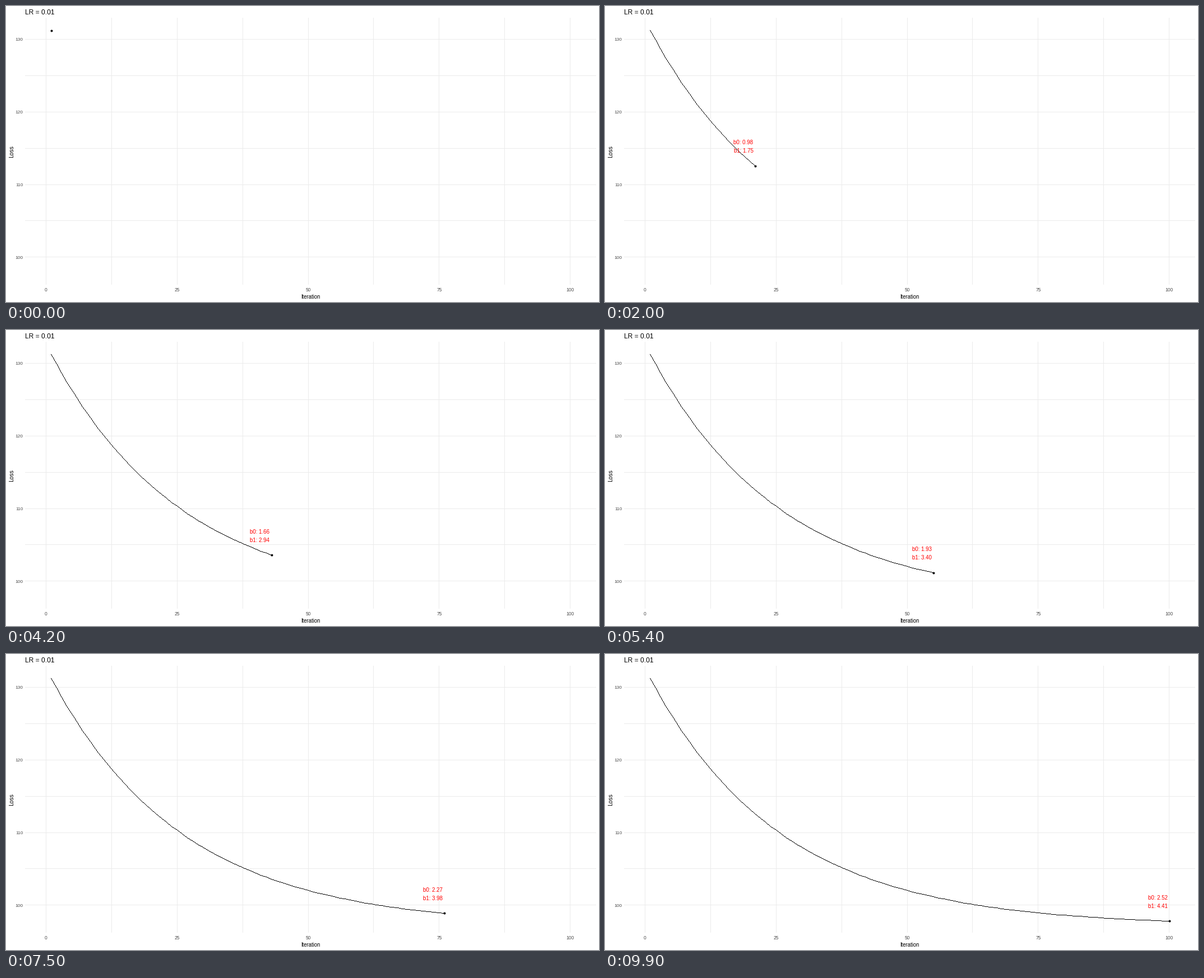
Write a matplotlib script that moves like this. It is 1058 px wide and 529 px high and loops after 10 s.

```python
import numpy as np
import matplotlib.pyplot as plt
from matplotlib.animation import FuncAnimation
from matplotlib.collections import PolyCollection
from matplotlib.patches import Rectangle

W, H, DPI = 1058, 529, 64
PT = 72 / DPI  # points per pixel
STEPS = 100
LEFT, RIGHT, TOP, BOTTOM = 34, 1053, 21, 498
GRID, TICK = "#ebebeb", "#4d4d4d"

plt.rcParams["font.family"] = "Liberation Sans"

fig = plt.figure(figsize=(W / DPI, H / DPI), dpi=DPI, facecolor="white")
ax = fig.add_axes([0, 0, 1, 1])
ax.set_xlim(0, W)
ax.set_ylim(H, 0)
ax.axis("off")


def px(iteration):
    return 71.3 + 9.355 * iteration


def py(loss):
    return 59.1 + 12.995 * (130 - loss)


def label(x, y, text, size, **kw):
    return ax.text(x, y, text, fontsize=size * PT,
                   **{"ha": "center", "va": "baseline", **kw})


def rule(x, y, w, h):
    ax.add_patch(Rectangle((x, y), w, h, fc=GRID, lw=0, zorder=1))


def pixel_line(x, y):
    """Pixels of a hard-edged line through whole-pixel points, with the
    number of pixels used up to each point."""
    pixels, counts = [np.array([[x[0], y[0]]])], [1]
    for i in range(1, len(x)):
        n = int(max(abs(x[i] - x[i - 1]), abs(y[i] - y[i - 1])))
        t = np.arange(1, n + 1) / n
        step = np.column_stack([x[i - 1] + t * (x[i] - x[i - 1]),
                                y[i - 1] + t * (y[i] - y[i - 1])])
        pixels.append(np.floor(step + 0.5))
        counts.append(counts[-1] + n)
    return np.vstack(pixels), counts


# Grid and axis labels
for v in np.arange(0, 101, 12.5):
    x = px(v)
    rule(np.floor(x), TOP, 1, BOTTOM - TOP)
    if v % 25 == 0:
        label(x, 510.5, f"{v:.0f}", 8.5, color=TICK)
for v in range(100, 131, 5):
    y = py(v)
    rule(LEFT, np.floor(y), RIGHT - LEFT, 1)
    if v % 10 == 0:
        label(30.3, y + 3.2, str(v), 8.3, color=TICK, ha="right")

label(33.5, 15, "LR = 0.01", 12, ha="left")
label(543, 523, "Iteration", 9.5)
label(15.2, 260.5, "Loss", 10.2, rotation=90, va="center", ha="right")

# Gradient descent: both coefficients and the loss decay geometrically
n = np.arange(STEPS)
loss_decay = 0.9612 ** n
coef_decay = 0.9804 ** n
xs = px(n + 1)
ys = py(97.13 + 34.07 * loss_decay)
b0 = 2.923 - 2.89 * coef_decay
b1 = 5.115 - 5.0 * coef_decay

pixels, counts = pixel_line(np.floor(xs), np.floor(ys))
corners = np.array([[0, 0], [1, 0], [1, 1], [0, 1]])
squares = pixels[:, None, :] + corners

panel = Rectangle((LEFT, TOP), RIGHT - LEFT, BOTTOM - TOP,
                  transform=ax.transData)
curve = PolyCollection([], facecolors="black", linewidths=0, zorder=3)
ax.add_collection(curve, autolim=False)
dot, = ax.plot([], [], "o", color="black", ms=4 * PT, mew=0, zorder=4)
notes = [label(0, 0, "", 9.8, color="red", zorder=5, clip_on=True)
         for _ in range(2)]
for note in notes:
    note.set_clip_path(panel)


def draw(i):
    curve.set_verts(squares[:counts[i]])
    dot.set_data([xs[i]], [ys[i]])
    for k, (note, b) in enumerate(zip(notes, (b0, b1))):
        note.set_position((xs[i] - 20.8, ys[i] - 38.5 + 15 * k))
        note.set_text(f"b{k}: {b[i]:.2f}")
    return [curve, dot, *notes]


anim = FuncAnimation(fig, draw, frames=STEPS, interval=100,
                     repeat=True, repeat_delay=0)
plt.show()
```
